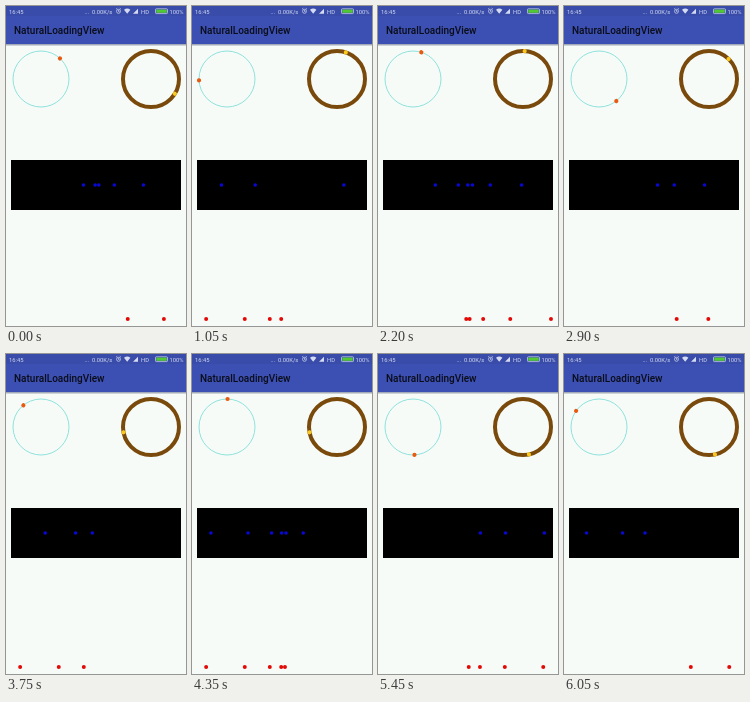
An HTML page that plays this animation: 180 by 320 pixels, repeating every 6.1 s.

```html
<!DOCTYPE html>
<html lang="en">
<head>
<meta charset="utf-8">
<title>Loading views</title>
<style>
  html, body { margin: 0; width: 100%; height: 100%; overflow: hidden; background: #f6fbf7; }
  svg { display: block; width: 180px; height: 320px; }
  text { font-family: Roboto, sans-serif; }
  .status { font-size: 5.8px; fill: #d5dbf2; }
</style>
</head>
<body>
<svg viewBox="0 0 180 320">
  <defs>
    <linearGradient id="shade" x2="0" y2="1">
      <stop stop-color="#8e97a8"/>
      <stop offset="1" stop-color="#f6fbf7"/>
    </linearGradient>
    <clipPath id="lane"><rect x="5" y="154" width="170" height="166"/></clipPath>
  </defs>

  <rect width="180" height="320" fill="#f6fbf7"/>
  <rect y="38" width="180" height="2.5" fill="url(#shade)"/>
  <rect width="180" height="38" fill="#3c50b4"/>
  <rect width="180" height="10" fill="#394ca9"/>

  <g class="status">
    <text x="3" y="7.6">16:45</text>
    <text x="78.5" y="7.6">...</text>
    <text x="86" y="7.6">0.00K/s</text>
    <text x="135" y="7.6">HD</text>
    <text x="163.5" y="7.6" textLength="">100%</text>
    <g fill="none" stroke="#d5dbf2" stroke-width=".7">
      <circle cx="112.5" cy="5.3" r="2"/>
      <path d="M112.5 4v1.5h1M110 3.2l1.3-1M115 3.2l-1.3-1"/>
      <rect x="149.5" y="2.8" width="12" height="4.8" rx=".8"/>
    </g>
    <path d="M118 3.8q3.2-2.4 6.4 0l-3.2 3.9zM127 7.7h5v-5z"/>
    <rect x="150.3" y="3.6" width="10.4" height="3.2" fill="#52c832"/>
  </g>
  <text x="8" y="27.6" font-size="10" font-weight="500" fill="#0b0d18">NaturalLoadingView</text>

  <circle cx="35" cy="73" r="28" fill="none" stroke="#83dfda" stroke-width=".9"/>
  <circle id="orange" cx="35" cy="45" r="2.1" fill="#e9590f"/>
  <circle cx="145" cy="73" r="28" fill="none" stroke="#794a0b" stroke-width="4"/>
  <circle id="yellow" cx="145" cy="45" r="2.1" fill="#fac81e"/>

  <rect x="5" y="154" width="170" height="50"/>
  <g id="dots" clip-path="url(#lane)"></g>
</svg>
<script>
  const LOOP = 6100, STEP = 50;
  const byId = id => document.getElementById(id);
  const mod = (a, n) => ((a % n) + n) % n;

  // Each spinner eases through one full turn per period.
  const spinners = [
    { dot: byId('orange'), cx: 35, period: 2400, offset: 537 },
    { dot: byId('yellow'), cx: 145, period: 600, offset: 237 }
  ];

  // "center" is when the last dot of the row passes the middle.
  const rows = [
    { count: 6, y: 179, r: 1.8, color: '#0808d2', period: 2400, center: 326 },
    { count: 5, y: 313, r: 2, color: '#e20a06', period: 3000, center: -648 }
  ];

  for (const row of rows) {
    row.dots = Array.from({ length: row.count }, () => {
      const dot = document.createElementNS('http://www.w3.org/2000/svg', 'circle');
      dot.setAttribute('cy', row.y);
      dot.setAttribute('r', row.r);
      dot.setAttribute('fill', row.color);
      return byId('dots').appendChild(dot);
    });
  }

  function draw(t) {
    for (const { dot, cx, period, offset } of spinners) {
      const u = mod(t + offset, period) / period;
      const angle = 180 * (1 - Math.cos(Math.PI * u));
      dot.setAttribute('transform', `rotate(${angle} ${cx} 73)`);
    }
    for (const { dots, period, center } of rows) {
      dots.forEach((dot, i) => {
        // Dots slow down toward the middle, then speed up again.
        const p = mod((t - center) / period + i * 0.1 + 0.5, 1) - 0.5;
        dot.setAttribute('cx', 90 + 680 * p * Math.abs(p));
      });
    }
  }

  const start = performance.now();
  function tick() {
    const t = (performance.now() - start) % LOOP;
    draw(Math.floor(t / STEP) * STEP);
    requestAnimationFrame(tick);
  }
  tick();
</script>
</body>
</html>
```
